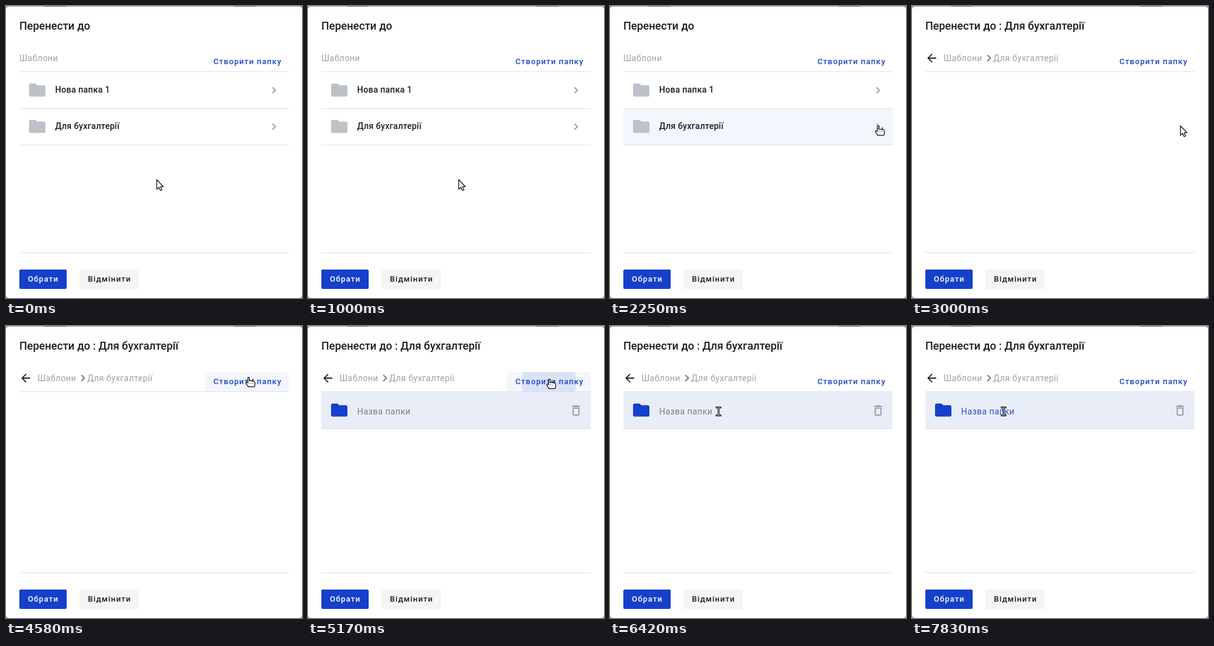
Animation, 488 px wide and 482 px high, one loop 8 s. Source, as an HTML page with a canvas:

```html
<!DOCTYPE html>
<html lang="uk">
<head>
<meta charset="utf-8">
<title>Перенести до</title>
<style>
  html, body { margin: 0; width: 100%; height: 100%; overflow: hidden; background: #fff; }
  canvas { display: block; width: 488px; height: 482px; }
</style>
</head>
<body>
<canvas id="stage"></canvas>
<script>
const W = 488, H = 482, LOOP = 8000;
const BLUE = '#1640cc', INK = '#1c1c22', GREY = '#a0a0a0', LINE = '#e0e0e0';
const canvas = document.getElementById('stage');
const dpr = window.devicePixelRatio || 1;
canvas.width = W * dpr;
canvas.height = H * dpr;
const ctx = canvas.getContext('2d');

const ICON = {
  folder: 'M10 4H4c-1.1 0-1.99.9-1.99 2L2 18c0 1.1.9 2 2 2h16c1.1 0 2-.9 2-2V8c0-1.1-.9-2-2-2h-8l-2-2z',
  chevron: 'M10 6L8.59 7.41 13.17 12l-4.58 4.59L10 18l6-6z',
  back: 'M20 11H7.83l5.59-5.59L12 4l-8 8 8 8 1.41-1.41L7.83 13H20z',
  bin: 'M16 9v10H8V9h8m-1.5-6h-5l-1 1H5v2h14V4h-3.5zM18 7H6v12c0 1.1.9 2 2 2h8c1.1 0 2-.9 2-2z'
};
for (const k in ICON) ICON[k] = new Path2D(ICON[k]);

const ARROW = new Path2D('M.5.7V16.6L4.2 13.2 6.6 18.7 9.1 17.6 6.8 12.2H11.5z');
const HAND = new Path2D('M-1.2 10V1.8Q-1.2.6 0 .6T1.3 1.8V6.4Q2.6 5.6 3.9 6.6 5.3 5.9 6.6 7 8-.0 6.6 7 ' +
  'Q8.4 6.4 9.6 7.7 10.5 8.3 10.4 9.6V12.6Q10.2 14.4 9.2 16.4H-.6Q-1.6 14.4-3.4 12.4L-4.5 10.6Q-4.7 8.7-2.8 8.9z');
const BEAM = new Path2D('M-3-6.5H-1.2Q0-6.5 0-5.4V5.4Q0 6.5-1.2 6.5H-3M3-6.5H1.2Q0-6.5 0-5.4M0 5.4Q0 6.5 1.2 6.5H3');

// pointer hotspot: time, x, y
const PATH = [
  [0, 248, 286], [1300, 248, 286], [1830, 420, 224], [2060, 442, 197],
  [3540, 442, 197], [4300, 401, 82], [4580, 400, 84], [4920, 398, 87],
  [5880, 398, 87], [6420, 179, 141], [6660, 151, 141], [LOOP, 151, 141]
];
const OPEN = 2920, CREATE = 5080;

const ramp = (t, a, b) => Math.min(1, Math.max(0, (t - a) / (b - a)));
const smooth = p => p * p * (3 - 2 * p);

function pointerAt(t) {
  const i = Math.max(1, PATH.findIndex(k => k[0] > t));
  const [t0, x0, y0] = PATH[i - 1], [t1, x1, y1] = PATH[i];
  const p = smooth(ramp(t, t0, t1));
  return [x0 + (x1 - x0) * p, y0 + (y1 - y0) * p];
}

function rect(x, y, w, h, color, r = 0) {
  ctx.fillStyle = color;
  ctx.beginPath();
  ctx.roundRect(x, y, w, h, r);
  ctx.fill();
}

function text(str, x, y, color, size, weight, spacing = 0) {
  ctx.font = `${weight} ${size}px Roboto, sans-serif`;
  ctx.letterSpacing = spacing + 'px';
  ctx.fillStyle = color;
  ctx.fillText(str, x, y);
}

const label = (s, x, y, color) => text(s, x, y, color, 14, 400, 0.4375);
const caption = (s, x, y, color) => text(s, x, y, color, 13, 500, 1.1);
const line = (y, color = LINE) => rect(22, y, 444, 1, color);

function icon(name, x, y, scale, color) {
  ctx.save();
  ctx.translate(x, y);
  ctx.scale(scale, scale);
  ctx.fillStyle = color;
  ctx.fill(ICON[name], 'evenodd');
  ctx.restore();
}

function faded(alpha, draw) {
  if (alpha <= 0) return;
  ctx.save();
  ctx.globalAlpha = alpha;
  draw();
  ctx.restore();
}

function drawFrame() {
  rect(0, 0, W, H, '#9b9b9b');
  rect(64, 0, 36, 1, '#5c5c5c');
  rect(377, 0, 36, 1, '#5c5c5c');
  rect(0, 1, W, H - 1, '#fff', 5);
  line(108);
  line(407);
  rect(22, 435, 78, 32, BLUE, 2);
  caption('Обрати', 36, 455, '#fff');
  rect(121, 435, 98, 32, '#f3f4f5', 2);
  caption('Відмінити', 135, 455, INK);
}

function drawRow(name, top) {
  icon('folder', 35.3, top + 13.6, 1.35, '#bcc2c8');
  text(name, 81, top + 34, INK, 14, 500, 0.25);
  icon('chevron', 431, top + 19.4, 0.9, '#969696');
  line(top + 60);
}

function drawList(t) {
  text('Перенести до', 22, 39, INK, 18, 500);
  label('Шаблони', 22, 91, GREY);
  faded(ramp(t, 1840, 2040), () => rect(22, 170, 444, 59, '#f3f6fd'));
  drawRow('Нова папка 1', 109);
  drawRow('Для бухгалтерії', 169);
}

function drawFolder() {
  text('Перенести до : Для бухгалтерії', 22, 39, INK, 18, 500);
  icon('back', 21.5, 75, 0.92, '#222');
  label('Шаблони', 52, 91, GREY);
  icon('chevron', 115.3, 74.4, 0.96, '#767676');
  label('Для бухгалтерії', 134, 91, GREY);
}

function drawNewRow(t) {
  rect(22, 109, 444, 60, '#e9edf8');
  line(169, '#dcdfe8');
  icon('folder', 35.3, 122.6, 1.35, BLUE);
  label('Назва папки', 81, 146, '#7c7f88');
  faded(ramp(t, 6920, 7080), () => {
    rect(80, 130, 100, 24, '#e9edf8');
    label('Назва папки', 81, 146, '#2a50cc');
  });
  icon('bin', 430.6, 128, 0.95, '#9a9da6');
}

function drawCreate(t) {
  const hover = ramp(t, 4080, 4280) - ramp(t, 6100, 6280);
  faded(hover, () => rect(328, 76, 138, 32, '#f3f6fd', 2));
  const p = ramp(t, 5060, 5510);
  if (p > 0) faded(1 - ramp(t, 5400, 5800), () => {
    ctx.beginPath();
    ctx.rect(328, 76, 138, 32);
    ctx.clip();
    ctx.fillStyle = '#dae2f5';
    ctx.beginPath();
    ctx.arc(397, 92, 80 * (1 - (1 - p) ** 3), 0, 7);
    ctx.fill();
  });
  caption('Створити папку', 342, 96, '#1d45c8');
}

function pointerKind(t, x, y) {
  if (x > 328 && x < 466 && y > 76 && y < 108) return 'hand';
  if (t < OPEN) return y > 109 && y < 229 ? 'hand' : 'arrow';
  return t > CREATE && y > 122 && y < 158 ? 'beam' : 'arrow';
}

function stroke(path, color, width) {
  ctx.strokeStyle = color;
  ctx.lineWidth = width;
  ctx.stroke(path);
}

function drawPointer(t) {
  const [x, y] = pointerAt(t);
  const kind = pointerKind(t, x, y);
  ctx.save();
  ctx.translate(x, y);
  ctx.lineJoin = 'round';
  if (kind === 'beam') {
    ctx.lineCap = 'square';
    stroke(BEAM, '#000', 3);
    stroke(BEAM, '#fff', 0.9);
  } else {
    const shape = kind === 'hand' ? HAND : ARROW;
    ctx.fillStyle = '#fff';
    ctx.fill(shape);
    stroke(shape, '#111', 1.25);
    if (kind === 'hand') for (let i = 0; i < 4; i++) rect(0.6 + i * 2.2, 10, 1, 1, '#444');
  }
  ctx.restore();
}

function render(now) {
  const t = now % LOOP;
  ctx.setTransform(dpr, 0, 0, dpr, 0, 0);
  drawFrame();
  if (t < OPEN) drawList(t);
  else drawFolder();
  if (t >= CREATE) drawNewRow(t);
  drawCreate(t);
  drawPointer(t);
}

let start;
function tick(now) {
  start ??= now;
  render(Math.max(0, now - start));
  requestAnimationFrame(tick);
}
requestAnimationFrame(tick);
</script>
</body>
</html>
```
